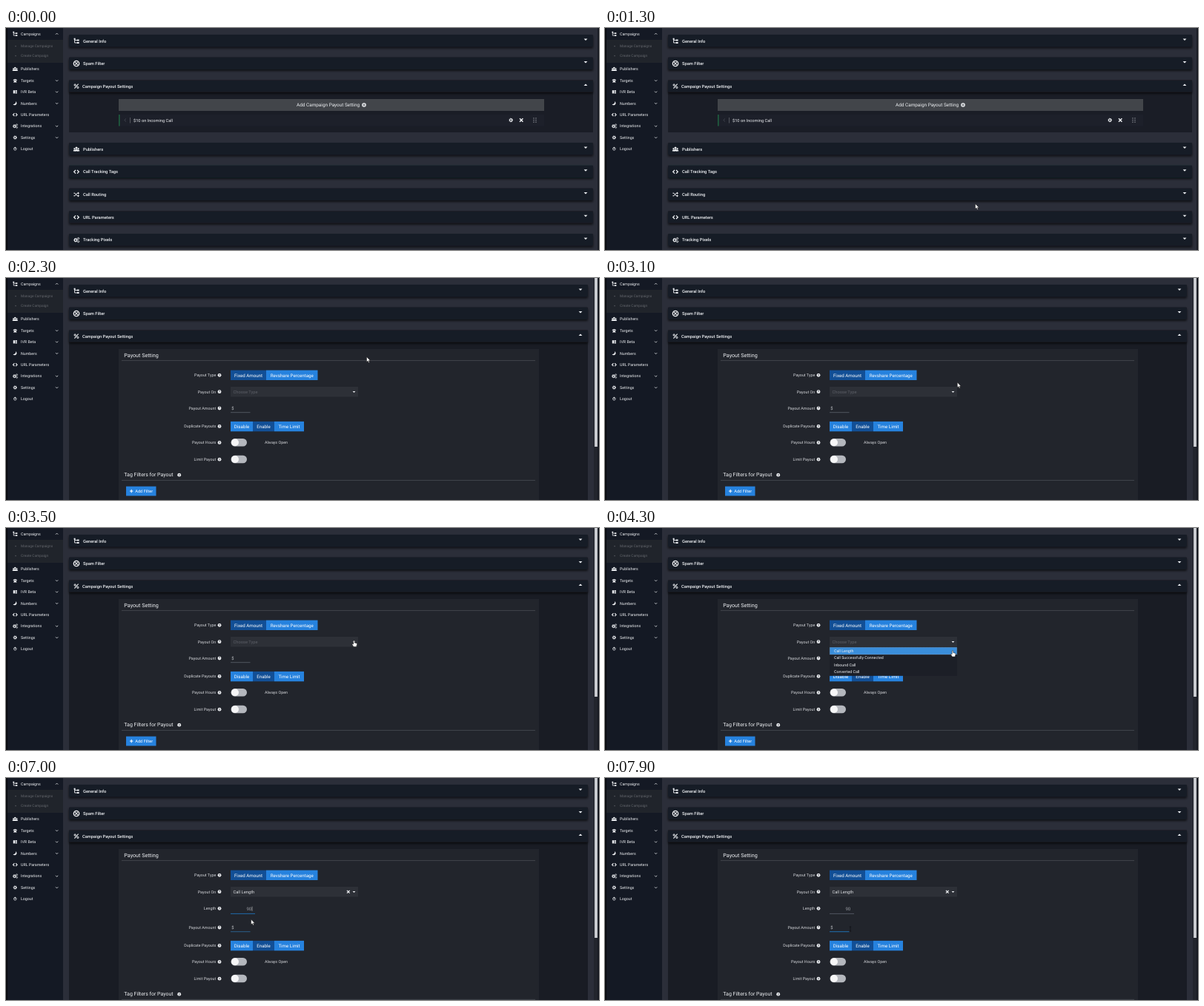
Write an HTML page that moves like this. It is 800x300 px and loops after 8 s.

```html
<!DOCTYPE html>
<html lang="en">
<head>
<meta charset="utf-8">
<title>Campaign payout settings</title>
<style>
html, body { margin: 0; width: 100%; height: 100%; overflow: hidden; background: #2b2e39; }
svg { display: block; width: 800px; height: 300px; }
text { font-family: Roboto, "Open Sans", sans-serif; text-rendering: geometricPrecision; white-space: pre; }
</style>
</head>
<body>
<svg id="stage" viewBox="0 0 800 300">
  <defs>
    <filter id="drop" x="-5%" y="-50%" width="110%" height="220%">
      <feDropShadow dx="0" dy="2" stdDeviation="1.6" flood-color="#000" flood-opacity=".65"/>
    </filter>
  </defs>
</svg>
<script>
const NS = "http://www.w3.org/2000/svg";
const stage = document.getElementById("stage");
const WHITE = "#eef0f3", BLUE = "#2682de", NAVY = "#124f96", DARK = "#171b25";

function add(parent, tag, attrs, content) {
  const node = document.createElementNS(NS, tag);
  for (const key in attrs) node.setAttribute(key, attrs[key]);
  if (content !== undefined) node.textContent = content;
  parent.appendChild(node);
  return node;
}
const group = (parent, x = 0, y = 0) => add(parent, "g", { transform: `translate(${x} ${y})` });
const rect = (parent, x, y, width, height, fill, more) =>
  add(parent, "rect", { x, y, width, height, fill, ...more });
const path = (parent, d, fill = WHITE, more) => add(parent, "path", { d, fill, ...more });
const line = (parent, d, stroke = WHITE, width = 1) =>
  path(parent, d, "none", { stroke, "stroke-width": width });
// y is the middle of the capital letters
const label = (parent, x, y, content, size, fill = WHITE, weight = 400, anchor = "start") =>
  add(parent, "text", { x, y: y + size * .356, "font-size": size, fill, "font-weight": weight, "text-anchor": anchor }, content);
const show = (node, on) => node.setAttribute("display", on ? "inline" : "none");

function gear(g, x, y, r, hole) {
  add(g, "circle", { cx: x, cy: y, r: r * .58, fill: "none", stroke: WHITE, "stroke-width": r * .5 });
  add(g, "circle", { cx: x, cy: y, r: r * .88, fill: "none", stroke: WHITE, "stroke-width": r * .3,
    "stroke-dasharray": r * .345, "stroke-dashoffset": r * .17 });
  add(g, "circle", { cx: x, cy: y, r: r * .3, fill: hole });
}

const icons = {
  tree(g) {
    line(g, "M-2.4 -3.5V2.5H1M-2.4 -1H1", WHITE, .9);
    rect(g, -3.4, -3.8, 2, 2, WHITE);
    rect(g, .8, -2, 2.8, 2, WHITE);
    rect(g, .8, 1.5, 2.8, 2, WHITE);
  },
  ban(g) {
    add(g, "circle", { r: 3.7, fill: "none", stroke: WHITE, "stroke-width": 1.3 });
    line(g, "M-2.4 -2.4L2.4 2.4M-1.8 1.8L1.8 -1.8", WHITE, 1.2);
  },
  percent(g) {
    line(g, "M2.6 -3L-2.6 3", WHITE, 1.1);
    for (const s of [-1, 1])
      add(g, "circle", { cx: 1.9 * s, cy: 1.7 * s, r: 1.1, fill: "none", stroke: WHITE, "stroke-width": 1 });
  },
  people(g) {
    for (const [x, y, r] of [[-2.6, -.6, 1.1], [2.6, -.6, 1.1], [0, -1.7, 1.5]]) {
      add(g, "circle", { cx: x, cy: y, r, fill: WHITE });
      path(g, `M${x - r * 1.4} 2.9V${y + r * 2}Q${x} ${y + r * .4} ${x + r * 1.4} ${y + r * 2}V2.9Z`);
    }
  },
  code(g) { line(g, "M-1 -2.3L-3.3 0L-1 2.3M1 -2.3L3.3 0L1 2.3", WHITE, 1.3); },
  shuffle(g) {
    line(g, "M-3.6 -1.8H-2L1 1.8H2.6M-3.6 1.8H-2L1 -1.8H2.6", WHITE, 1);
    path(g, "M2 -3.4L4 -1.8L2 -.2ZM2 .2L4 1.8L2 3.4Z");
  },
  gears(g) {
    gear(g, -1, .2, 2.8, DARK);
    gear(g, 2.6, -2, 1.6, DARK);
    gear(g, 2.6, 2.2, 1.6, DARK);
  },
  gear(g) { gear(g, 0, 0, 3, DARK); },
  phone(g) {
    path(g, "M-3.3 -.6Q0 -4 3.3 -.6L2.3 .4L1 -.7H-1L-2.3 .4ZM-1.3 0H1.3L2.7 3H-2.7Z");
  },
  grid(g) {
    rect(g, -3, -2.5, 2.6, 5, WHITE);
    rect(g, .2, -2.5, 2.8, 2.2, WHITE);
    rect(g, .2, .3, 2.8, 2.2, WHITE);
  },
  moon(g) { path(g, "M1 -3.2Q4.4 .6 .8 2.7Q-1.6 3.6 -3.4 1.7Q1.6 1.6 1 -3.2Z"); },
  power(g) {
    add(g, "circle", { r: 2.1, fill: "none", stroke: WHITE, "stroke-width": .9 });
    line(g, "M0 -3V0", WHITE, 1);
  }
};

function icon(parent, name, x, y, scale = 1) {
  icons[name](add(parent, "g", { transform: `translate(${x} ${y}) scale(${scale})` }));
}

function sidebar() {
  const g = group(stage);
  rect(g, 0, 0, 77, 300, "#141924");
  rect(g, 0, 0, 2, 300, "#090b10");
  rect(g, 2, 16, 75, 31, "#20242b");
  const items = [
    ["Campaigns", 8, "tree", -1], ["Publishers", 55.5, "people", 0], ["Targets", 71, "phone", 1],
    ["IVR Beta", 86.3, "grid", 1], ["Numbers", 101.8, "moon", 1], ["URL Parameters", 117.2, "code", 0],
    ["Integrations", 132.5, "gears", 1], ["Settings", 148, "gear", 1], ["Logout", 163.3, "power", 0]
  ];
  for (const [name, y, pic, fold] of items) {
    icon(g, pic, 12.3, y, .85);
    label(g, 20, y, name, 5.3);
    if (fold) line(g, `M67 ${y - .7 * fold}l1.6 ${1.6 * fold}l1.6 ${-1.6 * fold}`, WHITE, .8);
  }
  for (const [name, y] of [["Manage Campaigns", 24.6], ["Create Campaign", 37.6]]) {
    add(g, "circle", { cx: 13, cy: y, r: .8, fill: "#55585e" });
    label(g, 20, y, name, 4.85, "#63666c");
  }
}

function header(g, y, name, pic, right, open) {
  rect(g, 85, y - 8.5, right - 85, 16.5, DARK, { rx: 1, filter: "url(#drop)" });
  icon(g, pic, 95, y);
  label(g, name.startsWith("Campaign") ? 103 : 104, y, name, 5.75, WHITE, 500);
  const x = right - 10, v = open ? -1 : 1;
  path(g, `M${x - 2.4} ${y - 1.8 - 1.2 * v}h4.8l-2.4 ${2.5 * v}z`);
}

function topHeaders(g, right) {
  header(g, 17.5, "General Info", "tree", right);
  header(g, 48, "Spam Filter", "ban", right);
  header(g, 78.7, "Campaign Payout Settings", "percent", right, true);
}

function listView() {
  const g = group(stage);
  rect(g, 85, 86, 707, 55, "#1a1d26");
  topHeaders(g, 792);
  rect(g, 152, 96, 574, 16, "#42454a");
  const link = group(g);
  label(link, 392, 104, "Add Campaign Payout Setting", 6.42, "currentColor");
  add(link, "circle", { cx: 483, cy: 104, r: 2.8, fill: "currentColor" });
  line(link, "M481.4 104h3.2M483 102.4v3.2", "#42454a", .8);

  rect(g, 152, 117, 574, 15.5, "#1d202a");
  rect(g, 152, 117, 1.6, 15.5, "#1f6040");
  line(g, "M161.5 122.5l-1.4 2l1.4 2", "#4b4f58", .8);
  line(g, "M167.5 121v7.5", "#6a6d75", .7);
  label(g, 172, 124.6, "$10 on Incoming Call", 5.65);
  gear(g, 681.2, 124.5, 2.7, "#1d202a");
  line(g, "M693 122.3l4.4 4.4M697.4 122.3l-4.4 4.4", WHITE, 1.5);
  for (let i = 0; i < 6; i++)
    rect(g, 711.3 + i % 2 * 3, 121.3 + (i >> 1) * 2.6, 1.3, 1.3, "#8b8e95");

  const rest = [["Publishers", "people"], ["Call Tracking Tags", "code"], ["Call Routing", "shuffle"],
    ["URL Parameters", "code"], ["Tracking Pixels", "gears"]];
  rest.forEach(([name, pic], i) => header(g, 163.6 + 30.7 * i, name, pic, 792));
  rect(g, 798.3, 0, 1.7, 300, "#14171f");
  return { g, link };
}

function help(g, x, y) {
  add(g, "circle", { cx: x, cy: y, r: 2.4, fill: WHITE });
  label(g, x, y, "?", 4, "#21242b", 700, "middle");
}

function field(g, y, name) {
  label(g, 283.3, y, name, 5.38, "#d5d7db", 400, "end");
  help(g, 288, y);
}

function buttons(g, y, list) {
  for (const [x, w, name, on] of list) {
    rect(g, x, y - 6.7, w, 13.4, on ? NAVY : BLUE);
    label(g, x + w / 2, y, name, 6.2, "#fff", 400, "middle");
  }
}

function toggle(g, y) {
  rect(g, 303.5, y - 5.2, 21.5, 10.4, "#b4b7bd", { rx: 5.2 });
  add(g, "circle", { cx: 309, cy: y, r: 5, fill: "#f6f6f7" });
}

function formView() {
  const g = group(stage);
  rect(g, 85, 86, 700, 214, "#191c24");
  topHeaders(g, 785);
  rect(g, 152, 96, 567, 204, "#22252c");
  label(g, 159.3, 104.7, "Payout Setting", 7.2);
  line(g, "M156 111.6H714", "#4a4d54", .8);
  field(g, 131.3, "Payout Type");
  buttons(g, 131.3, [[303, 48, "Fixed Amount", true], [351, 69.5, "Revshare Percentage"]]);
  field(g, 153.7, "Payout On");
  rect(g, 303, 147, 172, 13.5, "#2d3037");
  const choice = label(g, 306.5, 153.9, "", 5.75);
  path(g, "M467.6 153h3.8l-1.9 2z");
  const clear = line(g, "M460 152l3.6 3.6M463.6 152l-3.6 3.6", WHITE, 1.2);

  const extra = group(g);
  field(extra, 176.3, "Length");
  const lengthLine = line(extra, "M303 183.4H336", "#2a5378", .9);
  const typed = label(extra, 331.3, 176.8, "", 6.1, "#9a9da3", 400, "end");
  const caret = line(extra, "M332 173.7v6", "#d0d2d6", .6);

  const lower = group(g);
  field(lower, 176, "Payout Amount");
  label(lower, 304.3, 176, "$", 5.8, "#c3c5ca");
  const amountLine = line(lower, "M303 181.7H329.5", "#48617a", .9);
  field(lower, 200.4, "Duplicate Payouts");
  buttons(lower, 200.6, [[303, 30, "Disable"], [333, 29, "Enable", true], [362, 40, "Time Limit"]]);
  field(lower, 222.4, "Payout Hours");
  toggle(lower, 222.3);
  label(lower, 349, 222.4, "Always Open", 5.4, "#d5d7db");
  field(lower, 245.2, "Limit Payout");
  toggle(lower, 245);
  label(lower, 159.3, 266, "Tag Filters for Payout", 7);
  help(lower, 233.7, 266.2);
  line(lower, "M156 273.4H714", "#4a4d54", .8);
  rect(lower, 162, 281.6, 40.5, 12.8, BLUE);
  line(lower, "M167 288h4.4M169.2 285.8v4.4", "#fff", 1.1);
  label(lower, 174.3, 288.1, "Add Filter", 5.6, "#fff");

  const menu = group(g);
  rect(menu, 303, 160.5, 172, 39.3, "#1c1f27");
  rect(menu, 303.3, 161.3, 171.4, 9.6, "#3a8edb", { stroke: "#b5cfe8", "stroke-width": .5, "stroke-dasharray": "1 1" });
  ["Call Length", "Call Successfully Connected", "Inbound Call", "Converted Call"]
    .forEach((name, i) => label(menu, 309, 166.1 + 9.5 * i, name, 5.3));

  rect(g, 793, 0, 7, 300, "#22252d");
  const thumb = rect(g, 794, 0, 4, 228, "#c9cbd0");
  rect(g, 798.3, 0, 1.7, 300, "#14171f");
  return { g, choice, clear, extra, lengthLine, typed, caret, lower, amountLine, menu, thumb };
}

const pointers = {
  arrow(g) {
    path(g, "M0 0V7L1.6 5.6L2.7 8L3.9 7.5L2.8 5.2H5Z", "#fff", { stroke: "#111", "stroke-width": .5 });
  },
  hand(g) {
    path(g, "M-.8 .5Q0 -.7 .8 .5V3L3.6 3.7Q4.3 4 4 5.4L3.2 8.4H-.6L-2.6 5.2Q-2.6 4 -.8 5Z",
      "#fff", { stroke: "#111", "stroke-width": .5 });
  },
  beam(g) { line(g, "M-1.2 -3H1.2M0 -3V3M-1.2 3H1.2", "#0c0e13", .7); }
};

sidebar();
const list = listView();
const form = formView();
const mouse = group(stage);
const shapes = {};
for (const name in pointers) {
  shapes[name] = group(mouse);
  pointers[name](shapes[name]);
}

// time, x, y
const route = [
  [1000, 506, 303], [1900, 486.5, 106.5], [2700, 486.5, 106.5], [3100, 475.3, 141],
  [3500, 469.5, 152], [3900, 469.5, 152], [4300, 469, 165.5], [4500, 469, 165.5],
  [5200, 333, 182], [5400, 333, 182], [5600, 333, 179], [6700, 333, 179],
  [7000, 330.6, 191], [7300, 331, 198], [7500, 331, 198], [7800, 331, 204]
];
// start time, pointer shape
const looks = [[0, ""], [1100, "arrow"], [1900, "hand"], [2300, "arrow"], [3400, "hand"],
  [4600, "arrow"], [5100, "beam"], [5800, ""], [6700, "beam"], [6900, "arrow"], [7300, "beam"]];

function place(t) {
  const i = route.findIndex(p => p[0] > t);
  if (i === 0) return route[0].slice(1);
  if (i < 0) return route[route.length - 1].slice(1);
  const [t0, x0, y0] = route[i - 1], [t1, x1, y1] = route[i];
  const k = (t - t0) / (t1 - t0);
  return [x0 + (x1 - x0) * k, y0 + (y1 - y0) * k];
}

function draw(t) {
  const opened = t >= 2300, chosen = t >= 4500;
  const onLength = t >= 5600 && t < 7700, onAmount = t >= 7700;
  show(list.g, !opened);
  show(form.g, opened);
  list.link.setAttribute("color", t >= 1900 ? "#2480e0" : WHITE);

  form.choice.textContent = chosen ? "Call Length" : "Choose Type";
  form.choice.setAttribute("fill", chosen ? "#dcdee2" : "#5c5f67");
  show(form.clear, chosen);
  show(form.extra, chosen);
  show(form.menu, t >= 3600 && !chosen);
  form.lower.setAttribute("transform", `translate(0 ${chosen ? 26 : 0})`);
  form.thumb.setAttribute("height", chosen ? 216 : 228);

  form.typed.textContent = t >= 6400 ? "90" : t >= 6000 ? "9" : "";
  show(form.caret, onLength);
  form.lengthLine.setAttribute("stroke", onLength ? "#1f72b8" : onAmount ? "#565c66" : "#2a5378");
  form.amountLine.setAttribute("stroke", onAmount ? "#2176c0" : chosen ? "#2d6596" : "#565c66");

  const look = looks.filter(l => l[0] <= t).pop()[1];
  for (const name in shapes) show(shapes[name], name === look);
  mouse.setAttribute("transform", `translate(${place(t).join(" ")})`);
}

const start = performance.now();
function tick() {
  const t = Math.max(0, performance.now() - start) % 8000;
  draw(Math.floor(t / 100) * 100);
  requestAnimationFrame(tick);
}
tick();
</script>
</body>
</html>
```
